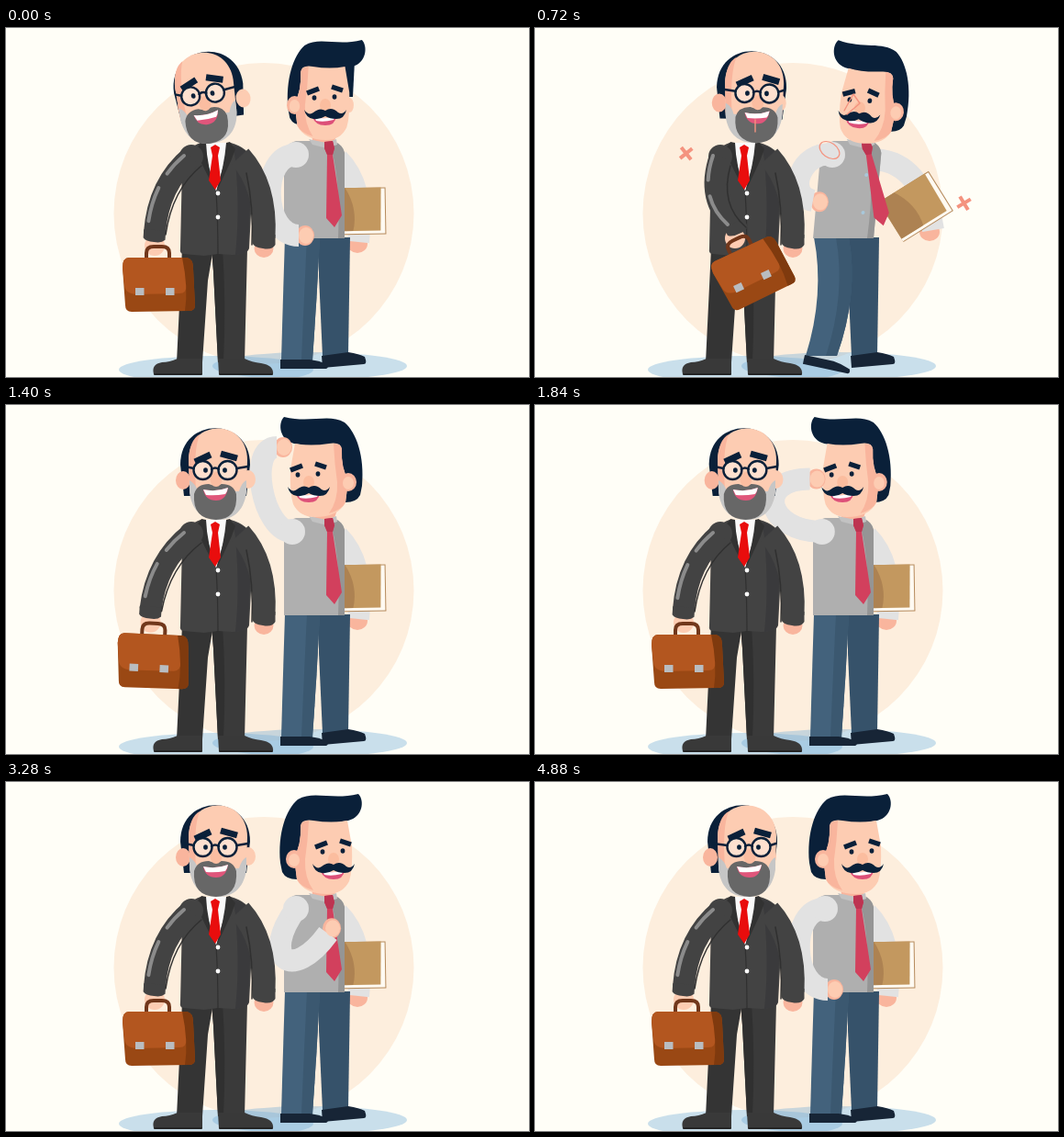
Write an HTML page with a canvas that moves like this. It is 570 by 380 pixels and loops after 4.92 s.

```html
<!DOCTYPE html>
<html>
<head>
<meta charset="utf-8">
<style>
html, body { margin: 0; width: 100%; height: 100%; overflow: hidden; background: #fffef7; }
canvas { display: block; }
</style>
</head>
<body>
<canvas id="stage" width="570" height="380"></canvas>
<script>
const ctx = document.getElementById('stage').getContext('2d');
const LOOP = 4920;
const SKIN = '#fdccb2', SHADE = '#f9b59d', NAVY = '#0a2039', SLEEVE = '#e2e2e2', SUIT = '#434343', MARK = '#f4937f';

function ease(t, from, to) {
  const u = Math.min(1, Math.max(0, (t - from) / (to - from)));
  return u * u * (3 - 2 * u);
}

// Rises from a to b, holds, falls from c to d.
const pulse = (t, a, b, c, d) => ease(t, a, b) - ease(t, c, d);

// How strongly each action is under way, 0 to 1; every pose is a sum of these.
const actions = t => ({
  opening: 1 - ease(t, 40, 500),
  bump: pulse(t, 40, 500, 880, 1200),
  swing: pulse(t, 860, 1120, 1120, 1600),
  scratch: pulse(t, 880, 1200, 1740, 2100),
  glance: pulse(t, 1750, 2100, 2350, 2700) + ease(t, 4480, 4800),
  chest: pulse(t, 2850, 3200, 3450, 3800),
  knot: pulse(t, 3450, 3800, 4200, 4600)
});

function fill(d, color) { ctx.fillStyle = color; ctx.fill(new Path2D(d)); }

function line(d, color, width, cap = 'round') {
  ctx.strokeStyle = color; ctx.lineWidth = width; ctx.lineCap = cap; ctx.lineJoin = 'round';
  ctx.stroke(new Path2D(d));
}

function oval(x, y, rx, ry, color) {
  ctx.fillStyle = color;
  ctx.beginPath(); ctx.ellipse(x, y, rx, ry, 0, 0, 7); ctx.fill();
}

// Draws in a frame rotated about (x, y), with that point as origin.
function at(x, y, deg, draw) {
  ctx.save(); ctx.translate(x, y); ctx.rotate(deg * Math.PI / 180);
  draw();
  ctx.restore();
}

function background() {
  ctx.fillStyle = '#fffef7'; ctx.fillRect(0, 0, 570, 380);
  oval(281, 202, 163.5, 164, '#fdeedd');
  oval(229, 372, 106, 15, 'rgba(120,175,215,.4)');
  oval(331, 368, 106, 15, 'rgba(120,175,215,.4)');
}

function bookArm({ bump }) {
  const wristX = 384 + 50 * bump, wristY = 233 - 13 * bump;
  oval(wristX - 1 - 3 * bump, wristY + 2, 11, 10, SHADE);
  line(`M${362 + 9 * bump} 143Q${391 + 31 * bump} ${172 - 25 * bump} ${wristX} ${wristY}`, SLEEVE, 24, 'butt');
  at(382 + 33 * bump, 199 - 5 * bump, -1 - 31 * bump, () => {
    fill('M-32 -25H32V26H-32Z', '#b58a5c');
    fill('M-32 -24H31V25H-32Z', '#fffaf2');
    fill('M-32 -25H27L26 22H-32Z', '#c3985f');
    fill('M-32 -25H-12Q2 -2 -4 22H-32Z', '#ad8252');
  });
}

function rightHead({ opening, bump, scratch, knot }) {
  const shift = 6 * opening + 12 * bump - 3 * scratch - 3 * knot;
  const look = 12 - 15 * opening - 19 * bump - 24 * scratch;
  const side = look < -5 ? -1 : 1, frontal = look * side < 5;
  at(350, 122 + 3 * bump, 6 * bump, () => {
    ctx.translate(shift - 5, -122);
    ctx.save();
    ctx.scale(side * (.93 + .07 * Math.abs(look) / 12), 1);
    fill('M-46 88C-49 56 -40 30 -27 19C-10 9 10 20 39 13C46 20 44 38 28 42L-22 50L-26 80L-28 106Q-40 106 -44 98Z', NAVY);
    ctx.translate((look * side - 12) * .5, 0);
    if (frontal) {
      fill('M24 38H38L36 75H28Z', NAVY);
      oval(32, 84, 5, 8, SKIN);
    }
    oval(-31, 84, 9, 10, SHADE);
    fill('M-24 48Q-23 40 -10 42Q10 45 27 42L32 70Q33 95 29 108Q22 122 5 122Q-20 122 -28 106L-31 82Q-23 68 -24 48Z', SKIN);
    fill('M-24 48Q-23 42 -15 42Q-16 64 -19 84Q-20 104 -10 118Q-24 114 -28 106L-31 82Q-23 68 -24 48Z', SHADE);
    oval(-31, 85, 6, 7, SKIN);
    ctx.restore();
    ctx.translate(look, 0);
    oval(0, 84, 6, 7, '#fbbd9f');
    line('M-20 71L-7 66M7 64L19 68', NAVY, 5.5, 'butt');
    oval(-12, 76, 2.4, 2.8, NAVY);
    oval(10, 75, 2.4, 2.8, NAVY);
    fill('M-14 97Q0 100 12 96Q11 106 0 106Q-11 106 -14 97Z', '#dd4f78');
    fill('M-12 97Q0 100 11 96L9 100Q-2 103 -10 101Z', '#fff');
    fill('M0 90Q7 85 14 92Q19 95 23 89Q21 99 12 99Q5 99 0 96Q-6 100 -13 99Q-21 98 -23 89Q-18 96 -13 92Q-6 86 0 90Z', NAVY);
  });
}

// The sleeve bows out from the middle of the shoulder-hand line; both bones keep their length.
function frontArm({ bump, scratch, chest, knot }) {
  const sx = 316 + 8 * bump - 4 * scratch, sy = 138;
  const hx = 319 - 16 * bump - 24 * scratch + 32 * chest + 36 * knot;
  const hy = 226 - 38 * bump - 180 * scratch - 61 * chest - 77 * knot;
  const bone = 51 - 17 * bump;
  const bow = Math.sqrt(Math.max(0, bone ** 2 - ((hx - sx) ** 2 + (hy - sy) ** 2) / 4)) + 4;
  const angle = Math.PI * (1 - .3 * chest - .43 * knot + .06 * bump);
  const dx = Math.cos(angle), dy = Math.sin(angle), reach = bow * 4 / 3;
  const palmX = hx - 7 * dx, palmY = hy - 7 * dy;
  oval(palmX, palmY, 10, 11, SHADE);
  line(`M${sx} ${sy}C${sx + reach * dx} ${sy + reach * dy} ${hx + reach * dx} ${hy + reach * dy} ${hx} ${hy}`, SLEEVE, 24, 'butt');
  oval(sx, sy, 14, 14, SLEEVE);
  oval(palmX + 1, palmY, 8, 9, SKIN);
}

function rightLegs({ bump }) {
  const fx = -5 * bump, fy = -5 * bump, knee = 14 * bump;
  const leg = (top, bottom) =>
    `M${top} 228H342Q${339 + knee} 290 ${334 + fx} ${362 + fy}H${bottom + fx}Q${(top + bottom) / 2 + knee} 290 ${top} 228Z`;
  fill('M341 228H375L373 356L345 358L341 270Z', '#36526a');
  fill(leg(304, 300), '#43627c');
  fill(leg(328, 322), '#3b5870');
  fill('M344 357L373 353Q385 355 391 358Q394 366 390 366L345 370Z', '#172536');
  at(299 + fx, 361 + fy, 12 * bump, () => fill('M0 0H32Q42 1 51 5Q53 9 50 10L0 10Z', '#172536'));
}

function rightTorso({ bump, knot }) {
  const lean = .09 * bump;
  ctx.save();
  ctx.transform(1, 0, -lean, 1, lean * 229, 0);
  fill('M316 123H352Q366 124 369 136L369 229H303V142Q304 126 316 123Z', '#afafaf');
  fill('M352 123Q366 124 369 136L369 229H362Q365 160 352 123Z', '#959595');
  fill('M333 114H361L357 126L347 127L334 122Z', SHADE);
  fill('M330 121L349 125L360 121L361 127L350 131L334 127Z', '#c2c2c2');
  oval(355, 160, 2, 2, '#a8c8db');
  oval(355, 201, 2, 2, '#a8c8db');
  ctx.restore();
  at(352 + 9 * bump, 125, -8 * bump - 13 * knot, () => {
    fill('M-5 -1L4 -2L6 6L4 13L14 79L6 92L-3 82L-2 13L-5 6Z', '#d2405d');
    fill('M-5 -1L4 -2L6 6L4 13H-2L-5 6Z', '#bd3451');
  });
}

function rightMan(act) {
  bookArm(act);
  rightLegs(act);
  rightTorso(act);
  rightHead(act);
  frontArm(act);
}

function briefcase(x, y, angle) {
  at(x, y, angle, () => {
    line('M-11 8V2Q-11 -5 -3 -5H6Q14 -5 14 2V8', '#71371b', 4);
    fill('M-30 7L33 7Q40 8 40 19L42 59Q42 65 35 65L-27 66Q-34 66 -34 59L-37 18Q-37 7 -30 7Z', '#9a4814');
    fill('M-30 7L28 7Q33 8 33 20L33 36Q33 46 25 46L-22 47Q-35 46 -35 36L-37 18Q-37 7 -30 7Z', '#b3561f');
    fill('M28 7H33Q40 8 40 19L42 59Q42 65 35 65H31Q35 40 28 7Z', '#7f3a0e');
    for (const clasp of [-23, 10]) fill(`M${clasp} 40h9.500v8h-9.500Z`, '#b9bdc1');
  });
}

function leftHead({ opening, bump, glance }) {
  const look = 6 * bump - 7 * opening + 7 * glance;
  const turn = 3 - 7 * opening + 2 * glance;
  at(229, 125, bump - 8 * opening, () => {
    ctx.translate(opening + 7 * bump - 2 * glance - 1, -125);
    fill('M-38 65C-38 12 38 12 38 65L34 99H-34Z', NAVY);
    oval(-35 - Math.min(0, look), 82, 8, 10, SHADE);
    oval(36 - Math.max(0, look), 81, 8, 10, SKIN);
    ctx.save();
    ctx.translate(turn, 0);
    fill('M-32 60C-32 14 32 14 32 60L31 92C28 118 14 124 0 124C-14 124 -28 118 -31 92Z', SKIN);
    fill('M-32 60Q-31 38 -20 32Q-27 50 -24 92H-31Z', SHADE);
    fill('M-31 82V95C-28 118 -14 125 0 125C14 125 28 118 31 95V82Q26 84 23 94H-22Q-24 86 -31 82Z', '#c6c6c6');
    ctx.restore();
    ctx.translate(look, 0);
    fill('M-23 97Q-20 86 -7 86Q0 89 7 86Q20 86 23 97Q25 124 1 125Q-25 124 -23 97Z', '#676767');
    fill('M-13 92Q1 95 14 90Q12 104 1 104Q-11 104 -13 92Z', '#e0567b');
    fill('M-13 92Q1 95 14 90Q13 95 11 97Q0 99 -10 98Z', '#fff');
    oval(1, 81, 6.5, 8, '#fbbda1');
    line('M-22 62L-5 54M6 53L24 58', NAVY, 7, 'butt');
    for (const s of [-1, 1]) {
      const lens = s * 13.5;
      oval(lens, 71, 10, 10, '#fee0cf');
      ctx.strokeStyle = NAVY; ctx.lineWidth = 2.4;
      ctx.beginPath(); ctx.arc(lens, 71, 10, 0, 7); ctx.stroke();
      oval(lens - s * 3, 71, 2.4, 2.8, NAVY);
      line(`M${lens + s * 10} 69L${s * 34 - look + turn * .5} 67`, NAVY, 2.4);
    }
    line('M-4 70Q0 67 4 70', NAVY, 2.4);
  });
}

function leftBody() {
  fill('M192 240H226L220 275L214 364H186Z', '#343434');
  fill('M224 240H263L260 364H231L226 265Z', '#3a3a3a');
  fill('M224 240H236Q240 300 237 364H231L226 265Z', '#303030');
  fill('M161 377Q158 366 170 364Q178 364 187 360H214V377Z', '#393939');
  fill('M231 360H260Q268 364 278 365Q292 367 291 377H232Z', '#393939');
  line('M162 377H213M233 377H290', '#242424', 2);

  oval(281, 240, 10.5, 10, SHADE);
  fill('M212 125H245Q264 130 270 146L265 240Q263 246 246 247L231 246L216 248L194 246Q189 246 190 240L192 150Q196 130 212 125Z', SUIT);
  fill('M248 128Q262 130 268 146L264 242Q260 246 250 247Q256 190 248 128Z', '#3a3a3c');
  line('M255 140Q284 172 281 228', SUIT, 25, 'butt');
  fill('M268.500 225H293.500V236Q290 242 280 240Q270 239 268.500 234Z', SUIT);
  line('M262 158Q270 195 268 236', '#303030', 1.5);
  fill('M213 125H244L229 178Z', '#fafafa');
  fill('M213 124L207 132L212 145L229 179Q219 150 218 125Z', '#323232');
  fill('M244 124L250 132L245 145L229 179Q238 150 240 125Z', '#323232');
  fill('M223 130L228 127L233 130L231 139L234 166L228 176L221 166L225 139Z', '#e90d0d');
  line('M229 178Q231 210 231 246', '#303030', 1.2);
  oval(231, 180, 2.4, 2.4, '#fff');
  oval(231, 206, 2.4, 2.4, '#fff');
}

function caseArm({ bump, swing }) {
  const elbowX = 166 + 20 * bump - 6 * swing, elbowY = 170 + 16 * bump;
  const wristX = 162 + 56 * bump - 12 * swing, wristY = 223 - 8 * bump - swing;
  const sleeve = `M202 140Q${elbowX} ${elbowY} ${wristX} ${wristY}`;
  oval(wristX, wristY + 14, 11, 11, SKIN);
  oval(202, 140, 13, 13, SUIT);
  line(sleeve, SUIT, 24, 'butt');
  at(wristX, wristY, 4 - 30 * bump, () => fill('M-12 -3H12V7Q8 11 0 10Q-9 10 -12 6Z', SUIT));
  line(`M213 150Q${elbowX + 15} ${elbowY + 6} ${wristX + 12} ${wristY + 2}`, '#303030', 1.5);
  ctx.save();
  ctx.translate(-8, -1);
  ctx.setLineDash([27, 18, 38, 200]);
  line(sleeve, '#8b8b8b', 4);
  ctx.restore();
  briefcase(wristX + 2, wristY + 20, 7 * swing - 25 * bump);
}

function leftMan(act) {
  leftBody();
  caseArm(act);
  leftHead(act);
}

function impactMarks(t) {
  const p = (t - 600) / 560;
  if (p <= 0 || p >= 1) return;
  const out = 1 - (1 - p) ** 4;
  ctx.save();
  ctx.globalAlpha = Math.min(1, (1 - p) * 3);
  const cross = (x, y, turn) => at(x, y, turn, () => line('M-6 -6L6 6M6 -6L-6 6', MARK, 4, 'butt'));
  cross(273 - 174 * out, 131 + 9 * out, 10 * out);
  cross(442 + 41 * out, 192 - 2 * out, 22 * out);
  if (p < .5) {
    at(321, 133, 35, () => line('M-12 0A12 8 0 1 1 12 0A12 8 0 1 1 -12 0', MARK, 1.2));
    line('M337 90L347 72L354 82L340 94M240 100V113', MARK, 1.4);
  }
  ctx.restore();
}

function frame() {
  const t = (performance.now() - start) % LOOP;
  const act = actions(t);
  background();
  rightMan(act);
  leftMan(act);
  impactMarks(t);
  requestAnimationFrame(frame);
}
const start = performance.now();
frame();
</script>
</body>
</html>
```
